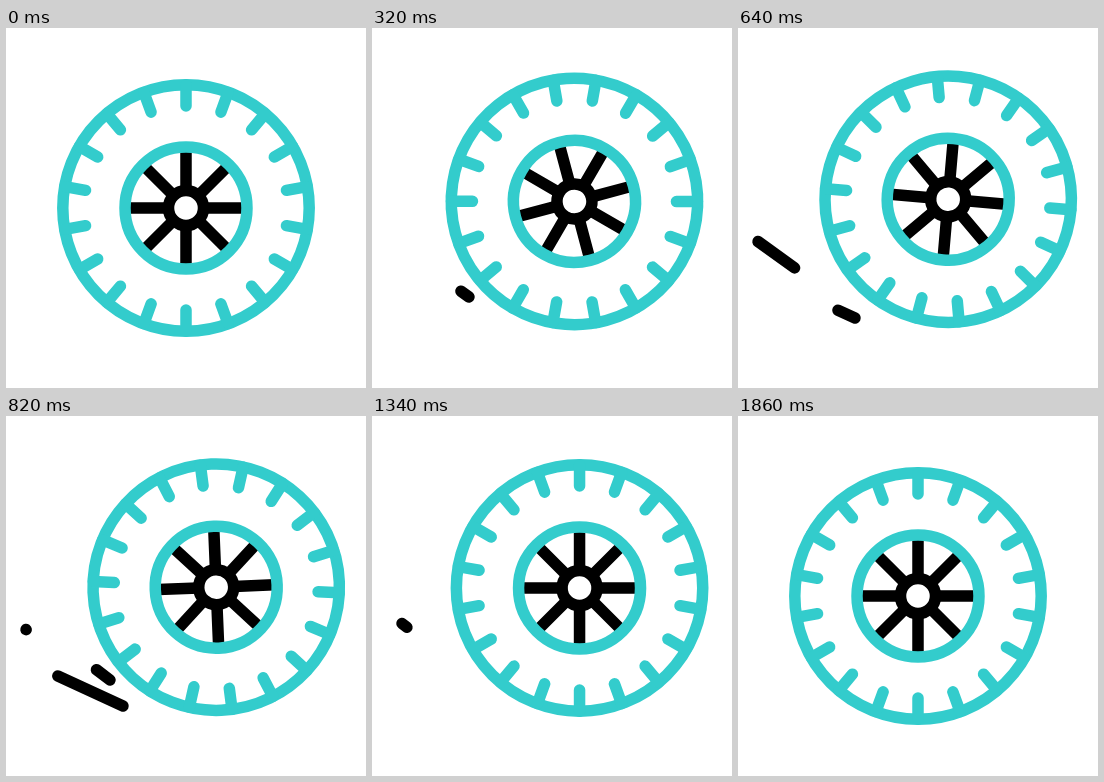
Animation of 360x360 px, one loop 2.04 s. Source, as an HTML page with a canvas:

```html
<!DOCTYPE html>
<html lang="en">
<head>
<meta charset="utf-8">
<title>Rolling wheel</title>
<style>
  html, body { margin: 0; width: 100%; height: 100%; overflow: hidden; background: #fff; }
  canvas { display: block; }
</style>
</head>
<body>
<canvas id="stage" width="360" height="360"></canvas>
<script>
const ctx = document.getElementById('stage').getContext('2d');
const LOOP = 2040, TEAL = '#33cccc', BLACK = '#000', TAU = Math.PI * 2;

// Speed streaks: start point, end point, start times of head and tail
const streaks = [
  { from: [97, 269], to: [20, 213.5], head: 242, tail: 437 },
  { from: [117, 290], to: [41, 255], head: 520, tail: 826 },
  { from: [104, 264], to: [30, 207.5], head: 713, tail: 1008 }
];
const STREAK_TIME = 395;

const mix = (a, b, k) => a + (b - a) * k;

// Eased progress between two moments
function ease(t, start, end) {
  const s = Math.min(1, Math.max(0, (t - start) / (end - start)));
  return s * s * (3 - 2 * s);
}

function line(x1, y1, x2, y2) {
  ctx.beginPath();
  ctx.moveTo(x1, y1);
  ctx.lineTo(x2, y2);
  ctx.stroke();
}

function ring(r) {
  ctx.beginPath();
  ctx.arc(0, 0, r, 0, TAU);
  ctx.stroke();
}

function spread(count, r1, r2) {
  for (let i = 0; i < count; i++) {
    ctx.save();
    ctx.rotate(i * TAU / count);
    line(0, -r1, 0, -r2);
    ctx.restore();
  }
}

function drawWheel(t) {
  const shift = ease(t, 0, 480) - ease(t, 1233, 1825);
  ctx.save();
  ctx.translate(180 + 30.2 * shift, 180 - 8.8 * shift);
  ctx.rotate(Math.PI * ease(t, 0, 1237));
  ctx.strokeStyle = BLACK;
  spread(8, 18, 58);
  ring(17.5);
  ctx.strokeStyle = TEAL;
  ring(61);
  ring(123.2);
  spread(18, 102, 123);
  ctx.restore();
}

function drawStreak({ from, to, head, tail }, t) {
  const a = ease(t, tail, tail + STREAK_TIME);
  const b = ease(t, head, head + STREAK_TIME);
  if (b - a < 0.001) return;
  const at = k => [mix(from[0], to[0], k), mix(from[1], to[1], k)];
  line(...at(a), ...at(b));
}

function frame(now) {
  const t = now % LOOP;
  ctx.fillStyle = '#fff';
  ctx.fillRect(0, 0, 360, 360);
  ctx.lineWidth = 11.5;
  ctx.lineCap = 'round';
  ctx.strokeStyle = BLACK;
  streaks.forEach(s => drawStreak(s, t));
  drawWheel(t);
  requestAnimationFrame(frame);
}
requestAnimationFrame(frame);
</script>
</body>
</html>
```
